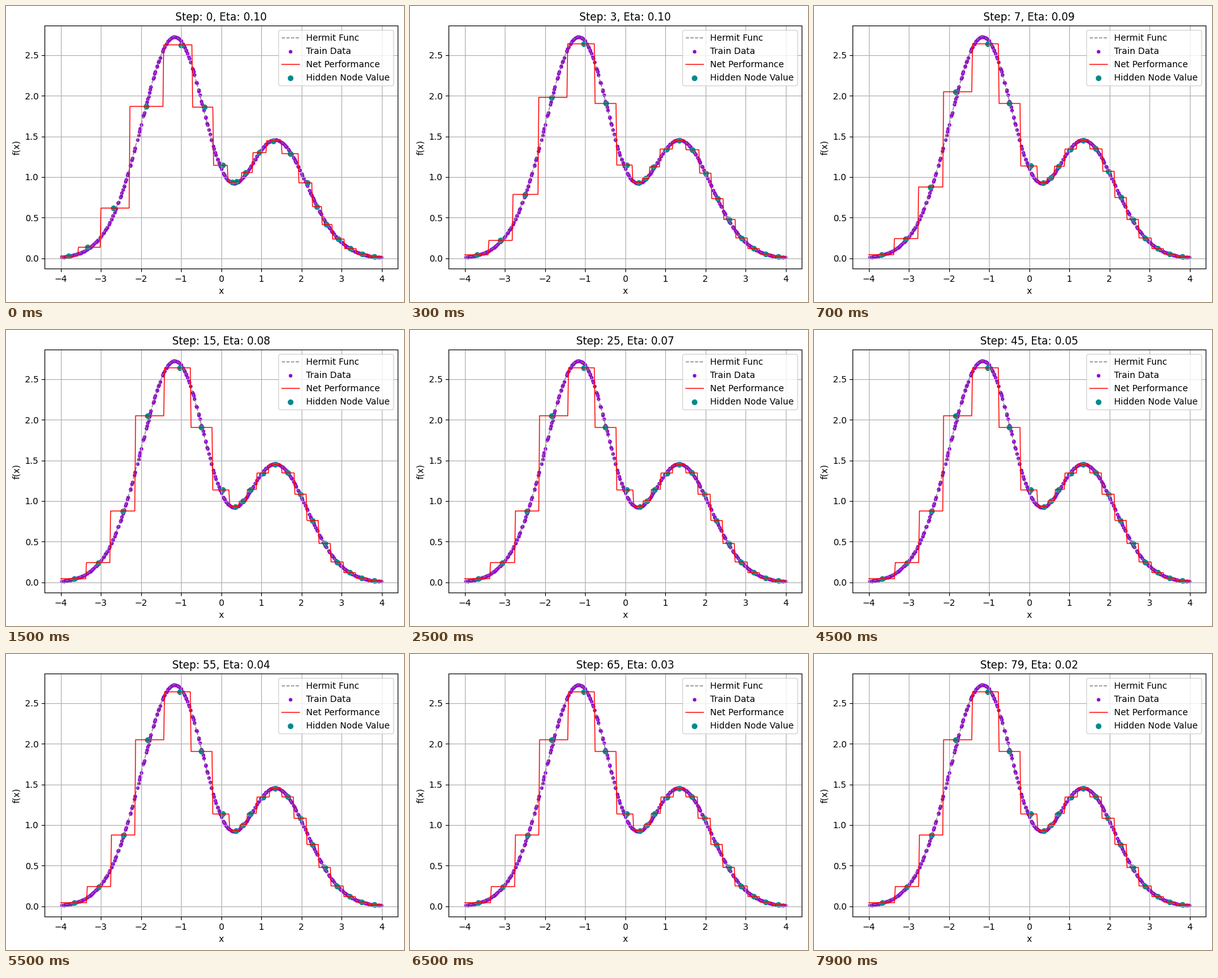
These frames come from a looping animation (630 by 469 pixels, 8000 ms). A matplotlib script:

```python
import numpy as np
import matplotlib.pyplot as plt
from matplotlib.animation import FuncAnimation

W, H, DPI = 630, 469, 100
STEPS, NODES, SAMPLES = 80, 20, 320


def hermit(x):
    return 1.1 * (1 - x + 2 * x**2) * np.exp(-x**2 / 2)


def cells(points, centers):
    return np.abs(points[:, None] - centers).argmin(axis=1)


# Evenly spread samples with jitter
rng = np.random.default_rng(7)
train = np.linspace(-3.98, 3.98, SAMPLES) + rng.uniform(-0.02, 0.02, SAMPLES)
target = hermit(train)
grid = np.linspace(-4, 4, 400)

# Node centers: settled layout, and how far each one starts from it
index = np.arange(NODES)
settled = np.interp(index, [0, 3, 4, 6, 7, 9, 19],
                    [-3.66, -1.83, -1.035, 0.039, 0.362, 0.732, 3.81])
offset = np.interp(index, [0, 1.5, 3.2, 5, 8, 11, 13, 15, 19],
                   [-0.15, -0.36, 0, 0.07, -0.16, -0.05, 0.18, 0.04, 0])


def nodes(step):
    """Centers settle fast, then creep; outputs are the mean of their cell."""
    x = settled + offset * (0.9 * np.exp(-0.6 * step) + 0.1 * np.exp(-step / 22))
    owner = cells(train, x)
    y = np.bincount(owner, target, NODES) / np.bincount(owner, minlength=NODES)
    return x, y


fig = plt.figure(figsize=(W / DPI, H / DPI), dpi=DPI, facecolor="white")
ax = fig.add_axes([61.25 / W, 53 / H, 559 / W, 384.66 / H])
ax.plot(grid, hermit(grid), "--", color="gray", lw=1, label="Hermit Func")
ax.scatter(train, target, s=10, color="darkviolet", label="Train Data")
net_line, = ax.plot(grid, np.zeros_like(grid), color="red", lw=1, label="Net Performance")
dots = ax.scatter(settled, hermit(settled), s=30, color="darkcyan", label="Hidden Node Value")
ax.set(xlim=(-4.4, 4.4), ylim=(-0.1249, 2.8586), xlabel="x", ylabel="f(x)")
ax.grid(True)
ax.legend(loc="upper right")
title = ax.set_title("")


def update(step):
    x, y = nodes(step)
    net_line.set_ydata(y[cells(grid, x)])
    dots.set_offsets(np.column_stack([x, y]))
    title.set_text(f"Step: {step}, Eta: {0.1 * (1 - step / 99):.2f}")
    return net_line, dots, title


anim = FuncAnimation(fig, update, frames=STEPS, interval=100, repeat=True, repeat_delay=0)
plt.show()
```
